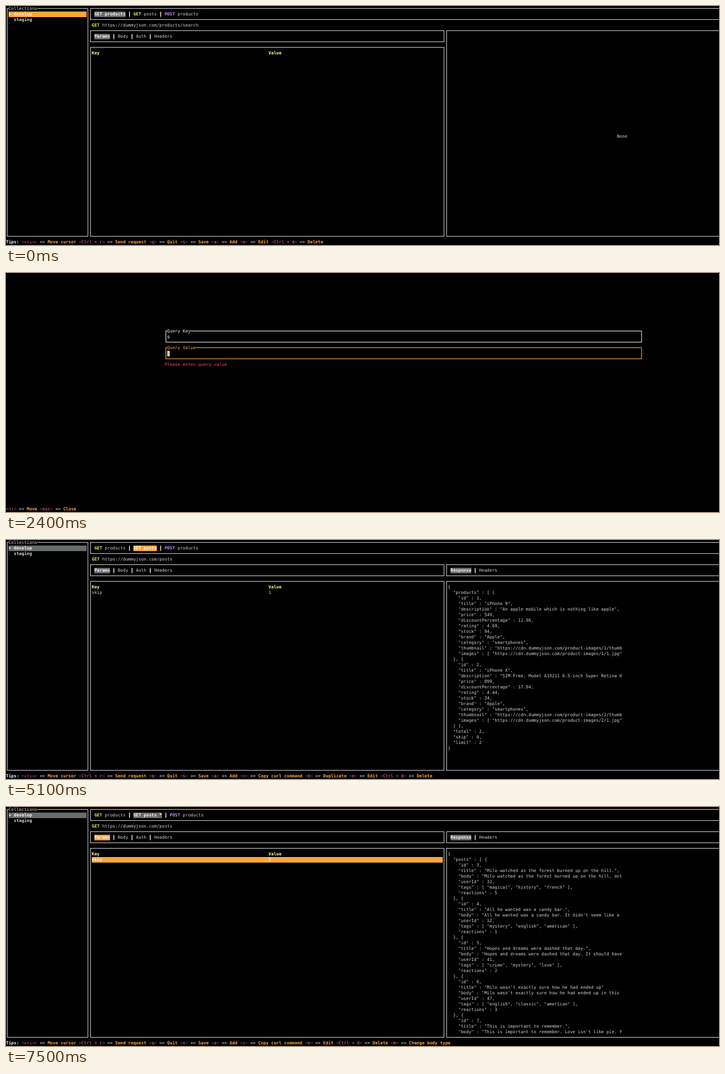
An HTML page for the animation above (8 s loop, 1280 by 430 pixels).

```html
<!DOCTYPE html>
<html lang="en">
<head>
<meta charset="utf-8">
<title>Terminal HTTP client</title>
<style>
html, body { margin: 0; width: 100%; height: 100%; overflow: hidden; background: #000; }
svg { display: block; width: 1280px; height: 430px; }
text {
  font: 7.7515px "DejaVu Sans Mono", "Liberation Mono", monospace;
  white-space: pre;
  text-rendering: geometricPrecision;
}
.b { font-weight: bold; }
</style>
</head>
<body>
<svg id="screen" viewBox="0 0 1280 430" xmlns="http://www.w3.org/2000/svg"></svg>
<script>
const LOOP = 8000;
const CW = 14 / 3, RH = 10;   // terminal cell
const C = {
  text: '#d2d2d2', white: '#f4f4f4', line: '#c4c4c4', orange: '#ffa53a', gray: '#686b6b',
  green: '#d3f36e', purple: '#c392ff', yellow: '#ffff87', pink: '#ff6f9c', error: '#ff4478',
  dim: '#8c5566', cursor: '#c6c8cf'
};
const screen = document.getElementById('screen');
const escape = s => s.replace(/&/g, '&amp;').replace(/</g, '&lt;').replace(/>/g, '&gt;');

function put(col, row, s, fill = C.text, bold = false) {
  return `<text x="${(col * CW).toFixed(2)}" y="${row * RH + 7.2}" fill="${fill}"` +
    `${bold ? ' class="b"' : ''}>${escape(s)}</text>`;
}

function fillCells(col, row, n, color) {
  return `<rect x="${(col * CW).toFixed(2)}" y="${row * RH}" width="${(n * CW).toFixed(2)}" height="${RH}" fill="${color}"/>`;
}

function box(c0, r0, c1, r1, color = C.line, title = '', titleColor = color) {
  const x = (c0 + .5) * CW, y = r0 * RH + 4.4;
  let s = `<rect x="${x.toFixed(2)}" y="${y}" width="${((c1 - c0) * CW).toFixed(2)}" height="${(r1 - r0) * RH}" ` +
    `fill="none" stroke="${color}" stroke-width="1.15"/>`;
  if (title) s += fillCells(c0 + 1, r0, title.length, '#000') + put(c0 + 1, r0, title, titleColor);
  return s;
}

// Consecutive pieces [text, color, bold] on one row
function run(col, row, pieces) {
  let s = '';
  for (const [str, color, bold] of pieces) {
    s += put(col, row, str, color, bold);
    col += str.length;
  }
  return s;
}

function tabBar(col, row, labels, active, focused) {
  let s = '';
  labels.forEach((label, i) => {
    const verb = /^(GET|POST) /.exec(label);
    if (i) s += `<rect x="${((col - 1.5) * CW - .7).toFixed(2)}" y="${row * RH + .3}" width="1.4" height="9.2" fill="${C.white}"/>`;
    if (i === active) {
      s += fillCells(col, row, label.length, focused ? C.orange : C.gray) + put(col, row, label, C.white, true);
    } else if (verb) {
      s += run(col, row, [[verb[1], verb[1] === 'GET' ? C.green : C.purple, true],
        [label.slice(verb[1].length), C.text]]);
    } else {
      s += put(col, row, label);
    }
    col += label.length + 3;
  });
  return s;
}

function hints(col, list) {
  const pieces = [];
  for (const [key, action] of list) {
    pieces.push(['<', C.dim], [key, C.pink], ['>', C.dim], [' => ', C.white], [action + ' ', C.orange, true]);
  }
  return run(col, 42, pieces);
}

function tips(focus) {
  const list = [['←↑↓→', 'Move cursor'], ['Ctrl + r', 'Send request'], ['q', 'Quit'], ['s', 'Save'], ['a', 'Add']];
  if (focus !== 'list') list.push(['c', 'Copy curl command']);
  if (focus === 'tabs') list.push(['d', 'Duplicate']);
  list.push(['e', 'Edit'], ['Ctrl + d', 'Delete']);
  if (focus === 'params') list.push(['m', 'Change body type']);
  return put(0, 42, 'Tips:', C.white, true) + hints(6, list);
}

// Each record lists its fields as they show in the pane, cut at its right edge
const fields = list => list.map(([key, value]) => `    "${key}" : ${value}`);
const records = (name, list) => ['{', `  "${name}" : [ {`,
  ...list.flatMap((r, i) => i ? ['  }, {', ...fields(r)] : fields(r))];

const product = (id, title, about, price, off, rating, stock) => [
  ['id', id + ','], ['title', `"${title}",`], ['description', `"${about}`], ['price', price + ','],
  ['discountPercentage', off + ','], ['rating', rating + ','], ['stock', stock + ','],
  ['brand', '"Apple",'], ['category', '"smartphones",'],
  ['thumbnail', `"https://cdn.dummyjson.com/product-images/${id}/thumb`],
  ['images', `[ "https://cdn.dummyjson.com/product-images/${id}/1.jpg"`]
];
const post = (id, title, body, user, tags, reactions) => [
  ['id', id + ','], ['title', `"${title}",`], ['body', `"${body}`], ['userId', user + ','],
  ['tags', `[ ${tags.split(' ').map(s => `"${s}"`).join(', ')} ],`], ['reactions', reactions]
];

const replies = {
  products: [
    ...records('products', [
      product(1, 'iPhone 9', 'An apple mobile which is nothing like apple",', 549, 12.96, 4.69, 94),
      product(2, 'iPhone X', 'SIM-Free, Model A19211 6.5-inch Super Retina H', 899, 17.94, 4.44, 34)
    ]),
    '  } ],', '  "total" : 2,', '  "skip" : 0,', '  "limit" : 2', '}'
  ],
  posts: records('posts', [
    post(3, 'Milo watched as the forest burned up on the hill.',
      'Milo watched as the forest burned up on the hill, onl', 32, 'magical history french', 5),
    post(4, 'All he wanted was a candy bar.',
      "All he wanted was a candy bar. It didn't seem like a", 12, 'mystery english american', 1),
    post(5, 'Hopes and dreams were dashed that day.',
      'Hopes and dreams were dashed that day. It should have', 41, 'crime mystery love', 2),
    post(6, "Milo wasn't exactly sure how he had ended up",
      "Milo wasn't exactly sure how he had ended up in this", 47, 'english classic american', 3)
      .map(([k, v]) => [k, k === 'title' ? v.replace(/,$/, '') : v]),
    post(7, 'This is important to remember.',
      "This is important to remember. Love isn't like pie. Y", 0, '', 0).slice(0, 3)
  ])
};

function replyPane(reply) {
  if (reply === 'sending') return put(232, 23, 'Sending...', C.text, true);
  if (reply === 'none') return box(169, 4, 300, 41) + put(235, 23, 'None');
  return box(169, 4, 300, 6) + tabBar(171, 5, ['Response', 'Headers'], 0, false) +
    box(169, 7, 300, 41) + replies[reply].map((line, i) => put(170, 8 + i, line)).join('');
}

function mainView(s) {
  const { focus, tab, dirty, row, selected } = s;
  const names = ['GET products', 'GET posts', 'POST products'];
  if (dirty) names[tab] += ' *';
  let out = box(0, 0, 31, 41, C.line, 'Collections', C.text) +
    fillCells(1, 1, 30, focus === 'list' ? C.orange : C.gray) +
    put(1, 1, '> develop', C.white, true) + put(3, 2, 'staging', C.text, true) +
    box(32, 0, 300, 2) + tabBar(34, 1, names, tab, focus === 'tabs') +
    run(33, 3, [['GET', C.green, true], [' https://dummyjson.com/' + ['products/search', 'posts'][tab], C.text]]) +
    box(32, 4, 168, 6) + tabBar(34, 5, ['Params', 'Body', 'Auth', 'Headers'], 0, focus === 'params') +
    box(32, 7, 168, 41) + put(33, 8, 'Key', C.yellow, true) + put(101, 8, 'Value', C.yellow, true);
  if (row) {
    const color = selected ? C.white : C.text;
    if (selected) out += fillCells(33, 9, 135, C.orange);
    out += put(33, 9, row[0], color, selected) + put(101, 9, row[1], color, selected);
  }
  return out + replyPane(s.reply) + tips(focus);
}

function dialogView({ values, active }) {
  const names = ['Query Key', 'Query Value'];
  let out = '';
  names.forEach((name, i) => {
    const top = 10 + 3 * i, color = i === active ? C.orange : C.white;
    out += box(61, top, 244, top + 2, i === active ? C.orange : '#e4e4e4', name, color) +
      put(62, top + 1, values[i], color);
    if (i === active) out += fillCells(62 + values[i].length, top + 1, 1, C.cursor);
  });
  const missing = values.indexOf('');
  if (missing >= 0) out += put(61, 16, 'Please enter ' + names[missing].toLowerCase(), C.error);
  return out + hints(0, [['↑↓', 'Move'], ['esc', 'Close']]);
}

// Value of the last step [start, value] reached at time t
const at = (t, steps) => steps.reduce((v, [start, next]) => t >= start ? next : v, null);

function stateAt(t) {
  if (t >= 1250 && t < 3400) {
    const typed = Math.max(0, Math.floor((t - 2600) / 80) + 1);
    return { values: [t < 1700 ? '' : 'q', 'iphone'.slice(0, typed)], active: t < 1950 ? 0 : 1 };
  }
  if (t >= 6400 && t < 7150) {
    return { values: ['skip', at(t, [[0, '1'], [6850, ''], [6900, '2']])], active: t < 6650 ? 0 : 1 };
  }
  return {
    focus: at(t, [[0, 'list'], [600, 'tabs'], [850, 'params'], [4850, 'tabs'], [5300, 'params']]),
    tab: t < 5100 ? 0 : 1,
    dirty: at(t, [[0, false], [3400, true], [4500, false], [7150, true]]),
    row: at(t, [[3400, ['q', 'iphone']], [5100, ['skip', '1']], [7150, ['skip', '2']]]),
    selected: t >= 6150,
    reply: at(t, [[0, 'none'], [4000, 'sending'], [4050, 'products'], [7450, 'sending'], [7500, 'posts']])
  };
}

let shown = '';
function draw(t) {
  const state = stateAt(t), key = JSON.stringify(state);
  if (key === shown) return;
  shown = key;
  screen.innerHTML = '<rect width="1280" height="430"/>' + (state.values ? dialogView(state) : mainView(state));
}

const start = performance.now();
function tick() {
  draw((performance.now() - start) % LOOP);
  requestAnimationFrame(tick);
}
tick();
</script>
</body>
</html>
```
